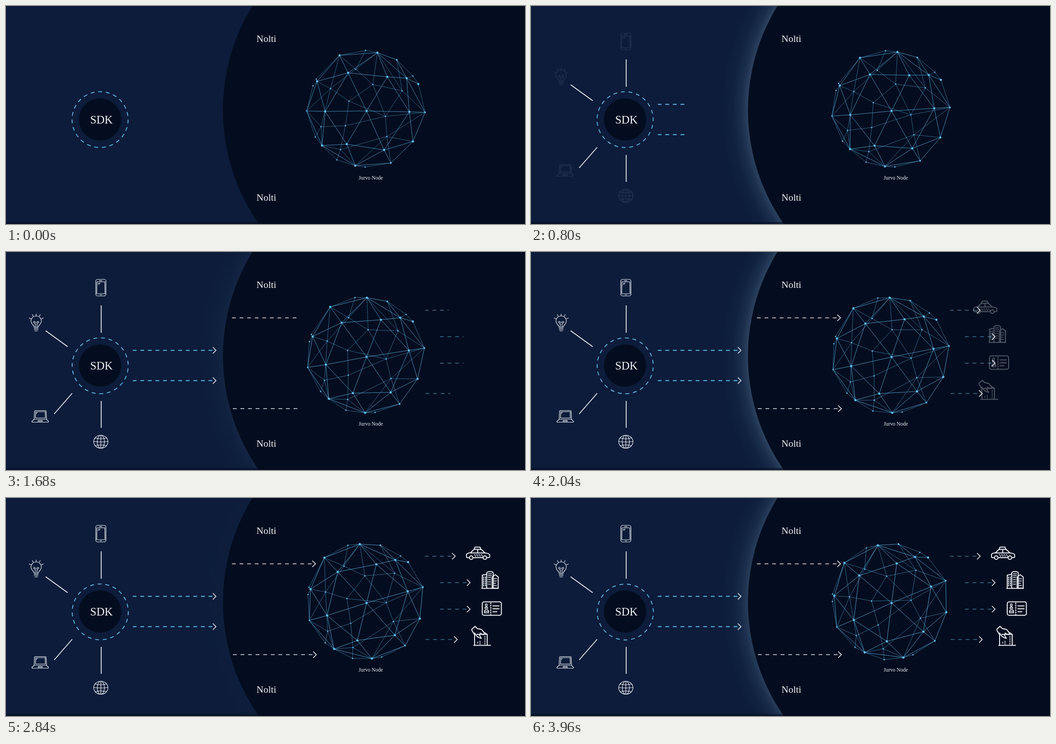
These frames come from a looping animation (1153 by 486 pixels, 4 s). An HTML page:

```html
<!DOCTYPE html>
<html lang="en">
<head>
<meta charset="utf-8">
<style>
  html, body { margin: 0; width: 100%; height: 100%; overflow: hidden; background: #0c1c3a; }
  svg { display: block; width: 1153px; height: 486px; }
  text { font-family: "Liberation Serif", "Times New Roman", serif; fill: #f2f3f5; text-anchor: middle; }
  .line { fill: none; stroke-linecap: round; stroke-linejoin: round; stroke: #f4f6f9; }
</style>
</head>
<body>
<svg viewBox="0 0 1153 486">
  <defs>
    <radialGradient id="halo">
      <stop offset=".881" stop-color="#8ab4cc" stop-opacity=".25"/>
      <stop offset=".91" stop-color="#7aa4c4" stop-opacity=".14"/>
      <stop offset=".95" stop-color="#6a94b8" stop-opacity=".05"/>
      <stop offset="1" stop-color="#6a94b8" stop-opacity="0"/>
    </radialGradient>
  </defs>
  <rect width="1153" height="486" fill="#0c1c3a"/>
  <circle id="glow" cx="927" cy="232" r="505" fill="url(#halo)"/>
  <circle cx="927" cy="232" r="445" fill="#040d1f"/>
  <rect y="482" width="1153" height="4" fill="#040d1f" opacity=".6"/>

  <circle cx="209" cy="253" r="47" fill="#040d1f"/>
  <circle id="ring" r="62.3" fill="none" stroke="#5fc0ee" stroke-width="1.8" pathLength="391" stroke-dasharray="8.7 8.3"/>
  <text x="212" y="262" font-size="25">SDK</text>
  <text x="578.5" y="79.5" font-size="21.3">Nolti</text>
  <text x="578.5" y="433.5" font-size="21.3">Nolti</text>
  <text x="810.5" y="387" font-size="11.6">Jurvo Node</text>

  <g id="globe" stroke="#5db9e8" fill="#62c0f0"></g>
  <g id="spokes" class="line" stroke-width="1.8" style="stroke-linecap:butt"></g>
  <g id="arrows" fill="none"></g>

  <g id="devices" class="line" stroke-width="1.2">
    <rect x="199.5" y="61" width="22.5" height="37" rx="4"/>
    <path d="M202 66.5h17.5l.5 26.5h-18.5zM207.5 63.8h6M204.5 72l2-3M207 72l2-3M209 95.5h3.5"/>
    <path d="M62.5 168c0-5-7-7-7-14a11.5 11.5 0 0 1 23 0c0 7-7 9-7 14zM62.5 170.5h9M62.5 173h9M64 176h6M65 167v-7l-4-4q2-3 4 0t4 0 4 0l-4 4v7"/>
    <path d="M67 138v4M58.5 139.5l2 3.5M76 139.5l-2 3.5M51.5 147l4 2M83 147l-4 2"/>
    <path d="M62.5 373l.8-17q0-2.5 2.5-2.5h21q2.500 0 2.500 2.500l.8 17zM65.500 370l.5-14h21l.5 14zM62.500 373l-5 4.500q-.5 2 2 2h33q2.500 0 2-2l-4.500-4.500M71 377.500l1-2h8l1 2zM67.500 360l2-2.500"/>
    <ellipse cx="210.700" cy="423" rx="15.800" ry="14.500"/>
    <ellipse cx="210.700" cy="423" rx="8" ry="14.500"/>
    <path d="M210.700 408.500v29M195 422.500q16 2 31.500 0M198 414.500q12 4 25.500 0M198 432q12-4 25.500 0"/>
  </g>

  <g id="services" class="line" stroke-width="2">
    <path d="M1028 133h-3q-2 0-2-3v-4q1-3 9-4l6-6q2-1.500 4-1.500h11q3 0 5 2l6 6q9 1 10.500 4v4q0 2.500-3 2.500h-2M1039 133h20M1032 122.500h31M1048 115v7M1040 114l2-4.500h11l2 4.500"/>
    <circle cx="1033.500" cy="133" r="4"/><circle cx="1064" cy="133" r="4"/>
    <path d="M1040 126.500h18M1042 129.500h18" stroke-dasharray="2.500 2.500" stroke-linecap="butt"/>
    <path d="M1058 201v-29l10-2v31M1068 201v-34q1-3 7.500-3t7 3v34M1080 201v-25l7-5 6.500 5v25zM1057 201.500h37"/>
    <path d="M1061 176v22M1065 176v22" stroke-dasharray="2 2.500"/>
    <path d="M1071 169h8M1071 173h8M1071 177h6M1071 182h6M1071 187h6M1071 192h6M1083 180h7M1083 185h7M1083 190h5M1083 195h7" stroke-width="1.500"/>
    <rect x="1058" y="231.500" width="42.500" height="30" rx="4"/>
    <path d="M1077 234v26" stroke-dasharray="2 3"/>
    <path d="M1081.500 240.500h14M1081.500 247h14M1081.500 253.500h9"/>
    <path d="M1064 246q0-3 3-3.500-2-2-2-4 0-2.500 2-2.500t2 2.500q0 2-2 4 3 .5 3 3.500zM1063 256v-4l2-3h5l2 3v4zM1064 253h7" stroke-width="1.700"/>
    <path d="M1041 305v22M1069 304v23M1046 304h23l-9-6M1039 328.500h37.500M1041 305l-6-10M1034.500 293l7.500-7 5 5 9 2q5 4 7 10l-3 2-7-4M1041 301q5 10 15 12l-5-9"/>
    <path d="M1064 308v18M1048 321v5M1053 319v7" stroke-dasharray="3 2" stroke-width="1.500"/>
  </g>
</svg>
<script>
const $ = id => document.getElementById(id);
const clamp = v => Math.max(0, Math.min(1, v));
const progress = (t, start, length) => clamp((t - start) / length);

function add(parent, tag, attrs) {
  const el = document.createElementNS("http://www.w3.org/2000/svg", tag);
  for (const key in attrs) el.setAttribute(key, attrs[key]);
  return parent.appendChild(el);
}

// Globe: near nodes, then far nodes; links are "node:neighbours"
const points = text => text.split(" ").map(p => p.split(",").map(Number));
const near = points("825,104 741,110 760,149 847,158 890,161 916,174 691,168 709,235 801,234 896,236 702,311 757,308 776,356 840,321 904,302 868,120 931,237 855,350");
const far = points("799,99 777,141 904,156 689,163 682,178 721,184 815,175 880,189 762,212 668,234 843,246 754,267 700,269 687,292 743,320 735,343 798,359 846,291");
const nodes = near.concat(far);

function addLinks(text, opacity) {
  const d = text.split(" ").map(group => {
    const [from, list] = group.split(":");
    return list.split(",").map(to => `M${nodes[from]}L${nodes[to]}`).join("");
  }).join("");
  add($("globe"), "path", { d, fill: "none", "stroke-width": .85, "stroke-opacity": opacity });
}
addLinks("0:1,2,3,4,15 1:2,6 2:3,6,7,8 3:4,8,9 4:9,15,16,5 6:7,27 7:8,27,10,11 8:9,11,13 9:16,14,13 10:11,12,27 11:13,12 12:13,17 13:14,17 14:16,17", .88);
addLinks("18:0,1 19:18,1,0,23,24 20:4,5,15 21:1,6 22:6,27 23:1,6,26,27,30 24:0,25,26,28 25:0,15,16,28 26:29,28 28:29,16,35 29:30,32 30:27,10,31 31:10,27 32:10,12,33,35 33:10,12 34:12,17 35:16,14,17,12 5:16", .58);
nodes.forEach(([cx, cy], i) =>
  add($("globe"), "circle", { cx, cy, stroke: "none", r: i > 17 ? 1.5 : i > 14 ? 1.9 : 2.4 }));

// Spokes: start point, end point, start time
const spokes = [
  [211.5, 180, 211.5, 119, 200], [137, 211, 88, 175.5, 195],
  [147, 315, 107, 361, 140], [211.5, 332, 211.5, 392, 165]
].map(([x1, y1, x2, y2, start]) =>
  ({ x1, y1, x2, y2, start, el: add($("spokes"), "line", { x1, y1 }) }));

// Dashed arrows, uncovered from left to right
const arrows = [];
function addArrow(x, y, tip, stroke, width, start, length) {
  const id = "clip" + arrows.length;
  const cover = add(add($("arrows"), "clipPath", { id }), "rect", { x, y: y - 10, height: 20 });
  const g = add($("arrows"), "g", { "clip-path": `url(#${id})` });
  add(g, "path", { d: `M${x} ${y}H${tip - 5}`, stroke, "stroke-width": width, "stroke-dasharray": "8.5 8.35" });
  add(g, "path", { d: `M${tip - 7} ${y - 7}l7 7-7 7`, stroke: "#f4f6f9", "stroke-width": 1.6 });
  arrows.push({ cover, size: tip - x + 2, start, length });
}
for (const y of [219.3, 286.8]) addArrow(281.5, y, 466.5, "#5fc0ee", 1.9, 455, 1000);
addArrow(502, 146.8, 687.5, "#e6e9ee", 1.6, 885, 1000);
addArrow(504, 349.2, 689.5, "#e6e9ee", 1.6, 885, 1000);
for (const [x, y, tip] of [[930.5, 129.8, 998], [964, 188.8, 1031], [964, 247.8, 1031], [932, 315.5, 1002.5]])
  addArrow(x, y, tip, "#3d7897", 1.5, 1150, 700);

function draw(now) {
  const t = now % 4000, angle = -t * .006;
  $("globe").setAttribute("transform", `rotate(${angle} 801 234)`);
  $("ring").setAttribute("transform", `translate(${209 + t / 8000} ${253.2 + t / 4000}) rotate(${angle})`);
  $("glow").setAttribute("opacity", Math.min(1, .65 * (1 - Math.cos(2 * Math.PI * t / 1470))));
  for (const { el, x1, y1, x2, y2, start } of spokes) {
    const p = progress(t, start, 500);
    el.setAttribute("x2", x1 + (x2 - x1) * p);
    el.setAttribute("y2", y1 + (y2 - y1) * p);
  }
  for (const { cover, size, start, length } of arrows)
    cover.setAttribute("width", size * progress(t, start, length));
  $("devices").setAttribute("opacity", progress(t, 680, 1000));
  const slide = progress(t, 1720, 1000);
  $("services").setAttribute("opacity", slide);
  $("services").setAttribute("transform", `translate(${58 * (slide - 1)} 0)`);
  requestAnimationFrame(loop);
}
let origin;
function loop(now) {
  origin ??= now;
  draw(now - origin);
}
draw(0);
</script>
</body>
</html>
```
